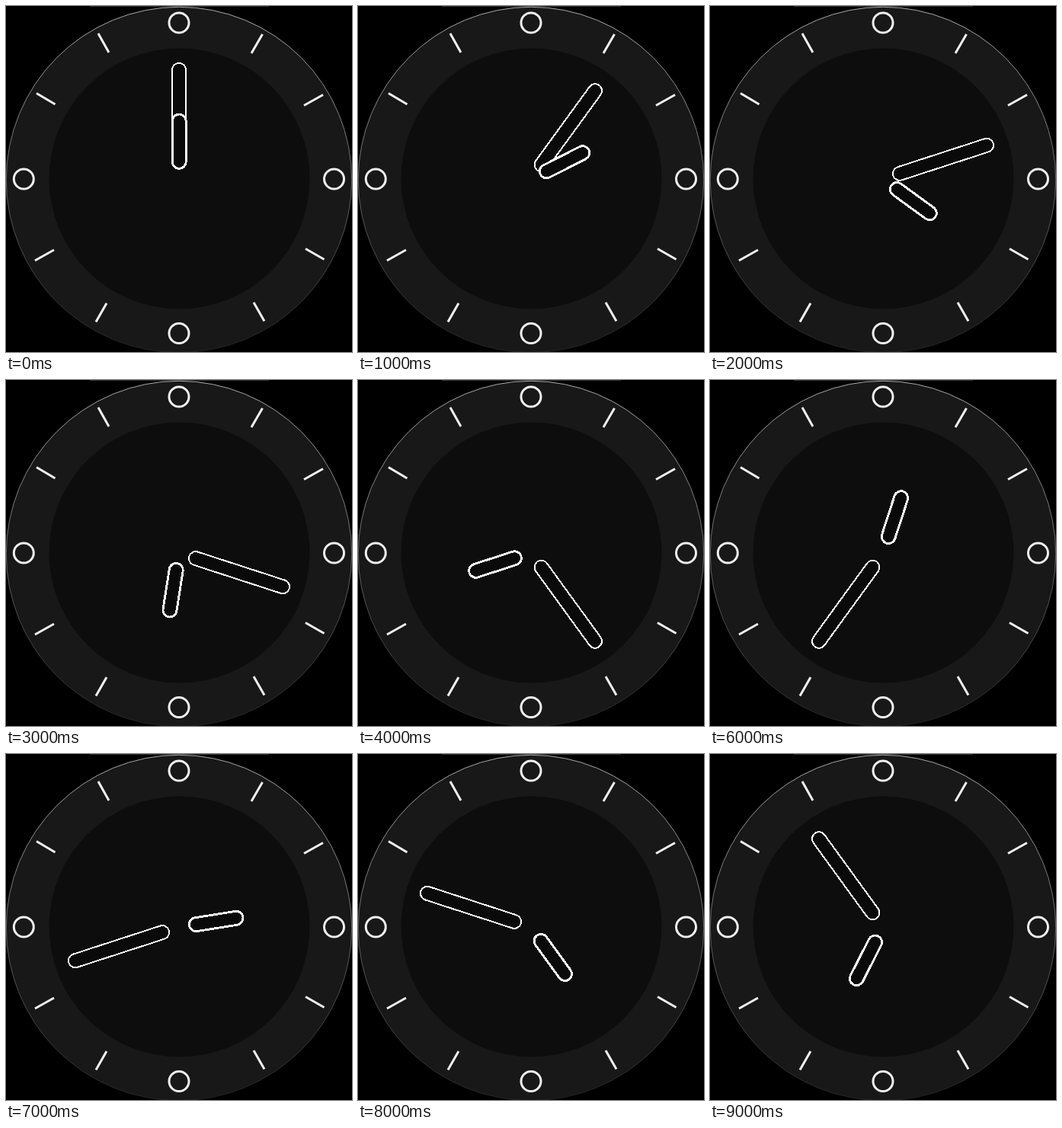
An HTML page that plays this animation: 454x454 px, repeating every 10 s.

```html
<!DOCTYPE html>
<html lang="en">
<head>
<meta charset="utf-8">
<title>Clock</title>
<style>
  html, body { margin: 0; width: 100%; height: 100%; overflow: hidden; background: #000; }
  svg { display: block; width: 100%; height: 100%; }
  .marks { fill: none; stroke: #f0f0f0; stroke-width: 3; }
  .hand { fill: #0a0a0a; stroke: #fff; stroke-width: 2; shape-rendering: crispEdges; }
  #hour { stroke-width: 2.9; }
</style>
</head>
<body>
<svg viewBox="0 0 454 454">
  <defs>
    <linearGradient id="rim" x1="0" y1="0" x2="0" y2="1">
      <stop offset="0" stop-color="#aaa"/>
      <stop offset=".5" stop-color="#666"/>
      <stop offset="1" stop-color="#222"/>
    </linearGradient>
  </defs>
  <path d="M110 .5H345" stroke="#333"/>
  <circle cx="227" cy="228" r="226.700" fill="#181818" stroke="url(#rim)"/>
  <circle cx="227.500" cy="226.500" r="171" fill="#0d0d0d"/>
  <g class="marks">
    <circle cx="227" cy="22" r="13"/>
    <circle cx="430.500" cy="227" r="13"/>
    <circle cx="227" cy="429.500" r="13"/>
    <circle cx="23.300" cy="227" r="13"/>
    <path d="M121 36L135 61M336.500 37L322 62M40 114.500L64.500 129M416 116.500L391 130.500
             M38 334L63 320M393 318.500L417.500 332.500M132 390L118 414.500M325 389L339 413.500"/>
  </g>
  <rect class="hand" id="minute" x="218" y="74.900" width="18" height="138.100" rx="9"/>
  <rect class="hand" id="hour" x="218.200" y="142" width="18" height="71.400" rx="9"/>
</svg>
<script>
  const STEPS = 10, STEP_MS = 1000;
  const MINUTE_STEP = 36, HOUR_STEP = 63;
  const minute = document.getElementById("minute");
  const hour = document.getElementById("hour");
  const turn = (hand, angle) => hand.setAttribute("transform", `rotate(${angle} 227 227)`);

  // Both hands jump once per second.
  function draw() {
    const step = Math.floor(performance.now() / STEP_MS) % STEPS;
    turn(minute, step * MINUTE_STEP);
    turn(hour, step * HOUR_STEP);
    requestAnimationFrame(draw);
  }
  draw();
</script>
</body>
</html>
```
